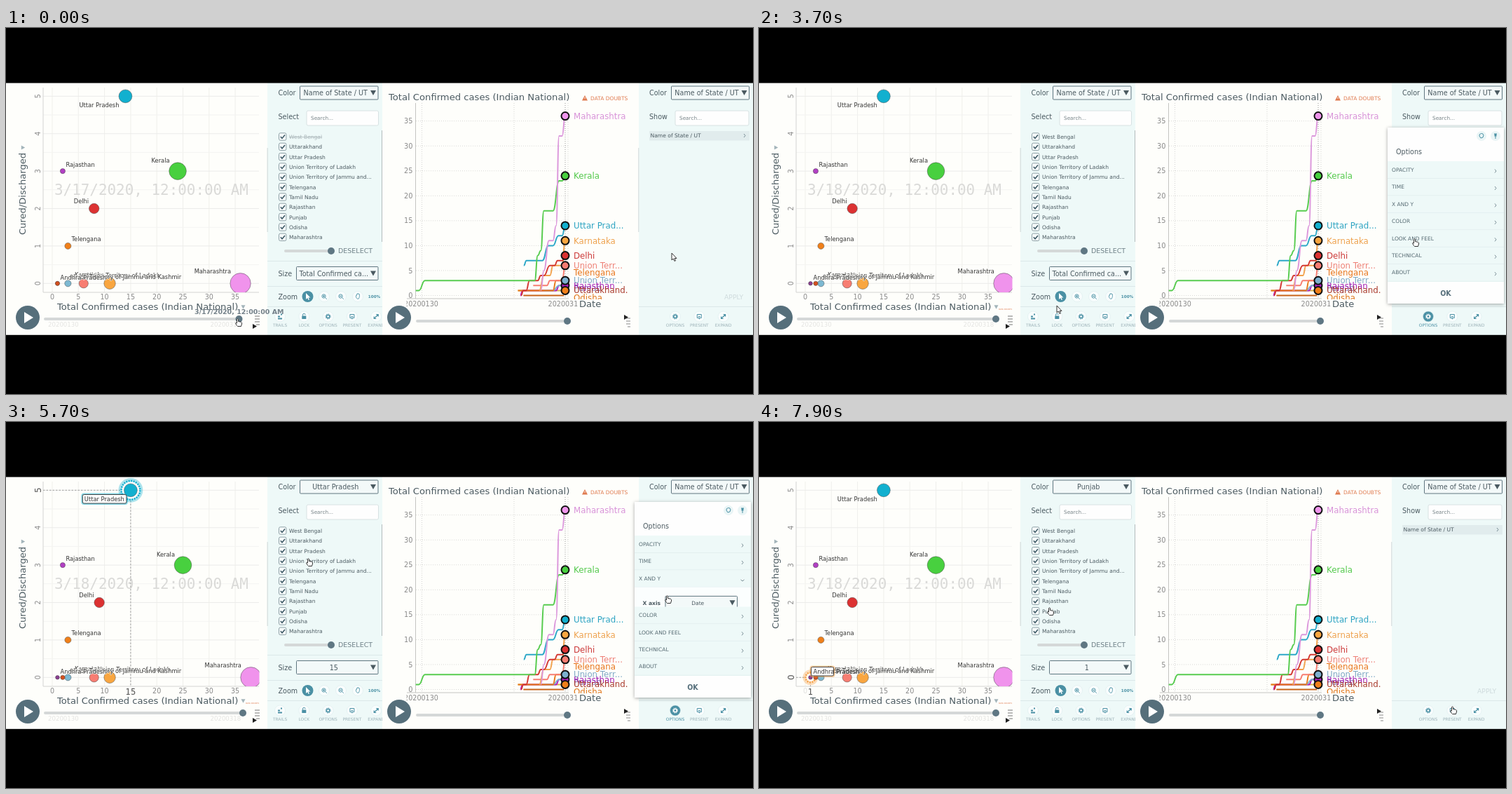
These frames come from a looping animation (1066x522 px, 8 s). An HTML page:

```html
<!DOCTYPE html>
<html lang="en">
<head>
<meta charset="utf-8">
<style>
html, body { margin: 0; width: 100%; height: 100%; overflow: hidden; background: #000; }
svg { display: block; font-family: "DejaVu Sans", sans-serif; white-space: pre; }
</style>
</head>
<body>
<svg id="stage" width="1066" height="522" viewBox="0 0 1066 522"></svg>
<script>
const stage = document.getElementById('stage');
const LOOP = 8000, STEP = 100;
const TOP = 78.5, TALL = 359.3;
const SLATE = '#566f7b', TEAL = '#4a90a4', INK = '#4b5a61', PALE = '#eef9f8', PAPER = '#fefefb';
const MID = ' text-anchor="middle" ', END = ' text-anchor="end" ', BOLD = ' font-weight="bold" ';

// Drawing helpers; text is placed by the middle of its capitals
const rect = (x, y, w, h, fill, more = '') =>
  `<rect x="${x}" y="${y}" width="${w}" height="${h}" fill="${fill}" ${more}/>`;
const dot = (x, y, r, fill, more = '') => `<circle cx="${x}" cy="${y}" r="${r}" fill="${fill}" ${more}/>`;
const path = (d, stroke, width = 1, more = '') =>
  `<path d="${d}" ${more} fill="none" stroke="${stroke}" stroke-width="${width}"/>`;
const shape = (d, fill) => `<path d="${d}" fill="${fill}"/>`;
const text = (x, y, s, size = 9.6, fill = INK, more = '') =>
  `<text x="${x}" y="${y + size * 0.365}" font-size="${size}" fill="${fill}" ${more}>${s}</text>`;
const clip = (x, y, w, h, inner) =>
  `<svg x="${x}" y="${y}" width="${w}" height="${h}" viewBox="${x} ${y} ${w} ${h}">${inner}</svg>`;
const at = (x, y, inner) => `<g transform="translate(${x} ${y})">${inner}</g>`;
const range = (n, f) => Array.from({ length: n }, (_, i) => f(i)).join('');
const short = (s, n) => s.length > n + 2 ? s.slice(0, n) + '...' : s;
const clamp = v => Math.max(0, Math.min(1, v));
const mix = (a, b, p) => a + (b - a) * p;

// Value of a track of [time, ...numbers] at time t
function along(track, t) {
  const i = track.findIndex(k => k[0] > t);
  if (i < 0) return track.at(-1).slice(1);
  if (!i) return track[0].slice(1);
  const a = track[i - 1], b = track[i], p = (t - a[0]) / (b[0] - a[0]);
  return a.slice(1).map((v, j) => mix(v, b[j + 1], p));
}

// name, cases on day 1, cases on day 2, cured, radius, colour, label side, label dx, dy
const LADAKH = 'Union Territory of Ladakh', JAMMU = 'Union Territory of Jammu and Kashmir';
const bubbles = [
  ['Maharashtra', 36, 38, 0, 14.7, '#f093ec', 'end', -13.5, -17],
  ['Kerala', 24, 25, 3, 12.3, '#48d03f', 'end', -11.5, -15.5],
  ['Uttar Pradesh', 14, 15, 5, 9.4, '#12b0cf', 'end', -9, 12.5],
  ['Karnataka', 11, 11, 0, 8.2, '#f9a640', 'end', -8, -12.5],
  ['Delhi', 8, 9, 2, 7.2, '#dc3232', 'end', -7.5, -11],
  [LADAKH, 6, 8, 0, 6.6, '#f77d72', 'start', 5, -11.5],
  [JAMMU, 3, 3, 0, 4.6, '#7db9d2', 'start', 4, -9],
  ['Telengana', 3, 3, 1, 4.5, '#f0801a', 'start', 5, -10],
  ['Rajasthan', 2, 2, 3, 3.6, '#b23fc4', 'start', 4.5, -9],
  ['Andhra Pradesh', 1, 1, 0, 2.8, '#8a3f90', 'start', 4, -8.5],
  ['', 1, 2, 0, 3.1, '#d4501e', 'start', 0, 0]
];
const single = (name, color) => [name, 1, 1, 0, 3, color, 'start', 4, -8.5];
const singles = [single('Punjab', '#f5a045'), single('Tamil Nadu', '#a8d878'), single('Odisha', '#e0702a'),
  single('Uttarakhand', '#c8501e'), single('West Bengal', '#9a6fc0')];
const rows = ['West Bengal', 'Uttarakhand', 'Uttar Pradesh', LADAKH, JAMMU, 'Telengana',
  'Tamil Nadu', 'Rajasthan', 'Punjab', 'Odisha', 'Maharashtra'];
const rowY = i => 155 + 14.33 * i;

// Line chart: colour and [day, cases] points, days counted from January 30
const lines = [
  ['#c8641a', [[33.3, 0], [46.6, 0]]],
  ['#d8b048', [[31.5, 1], [36, 1], [47, 1]]],
  ['#b01fc0', [[32.3, 0], [33, 1], [36, 1], [44, 1], [45, 2], [47, 2]]],
  ['#7db0cf', [[40, 1], [43, 1], [45, 2], [46, 2], [47, 3]]],
  ['#e87a1c', [[31.5, 1], [43, 1], [44, 3], [47, 3]]],
  ['#f77d72', [[36.5, 2], [41, 2], [42, 3], [46, 3], [47, 6]]],
  ['#f2a24c', [[38.5, 1], [40, 4], [42, 4], [43, 6], [46, 6], [47, 11]]],
  ['#d43a34', [[32.5, 0], [33.3, 1], [34.2, 1], [35.3, 3], [38, 3], [39, 4], [40, 4], [42, 6], [43.5, 6], [44.5, 7], [46, 7], [47, 8]]],
  ['#2ca8c8', [[33.4, 6], [34.3, 7], [39.5, 7], [41.5, 10], [43, 10], [44.8, 12], [46, 12], [47, 14]]],
  ['#58cc50', [[-2, 1], [-1, 1], [1, 3], [37, 3], [38, 8], [39, 9], [40, 17], [43, 17], [45, 23], [46, 23], [47, 24]]],
  ['#dc98dc', [[39, 1], [40, 5], [41.7, 11], [43, 11], [44, 14], [45, 32], [46, 32], [47, 36]]]
];
const dayX = d => 593.5 + 4.351 * d, casesY = v => 381.5 - 7.11 * v;
function curve(points) {
  let d = '', px, py;
  for (const [day, v] of points) {
    const x = dayX(day), y = casesY(v), m = (px + x) / 2;
    d += d ? `C${m} ${py} ${m} ${y} ${x} ${y}` : `M${x} ${y}`;
    [px, py] = [x, y];
  }
  return d;
}
// name, cases, label y, marker colour, label colour
const legend = [
  ['Odisha', 0, 385, '', '#e0761a'],
  ['Punjab', 1.4, 371, '', '#8a7ab8'],
  ['Rajasthan', 2, 367.5, '#b01fc0', '#a31fb4'],
  ['Uttarakhand.', 1, 374, '#f0801a', '#a8382a'],
  ['Union Territory', 3, 360, '#7db0cf', '#7fa9c6'],
  ['Telengana', 3, 349, '', '#e8741a'],
  ['Union Territory', 6, 339, '#f77d72', '#ee8076'],
  ['Delhi', 8, 325, '#dc3232', '#cc3a3a'],
  ['Karnataka', 11, 303.5, '#f9a640', '#eea24e'],
  ['Uttar Pradesh', 14, 282, '#12b0cf', '#2ba3c2'],
  ['Kerala', 24, 211, '#48d03f', '#52c94a'],
  ['Maharashtra', 36, 126, '#ef95ec', '#d892d8']
];

// Pointers: time, x, y
const leftTrack = [[1200, 332, 420], [2200, 337, 421], [2800, 340, 421], [3700, 428, 402], [4000, 429, 417],
  [4600, 434, 317], [4700, 435, 301], [5600, 433, 188], [5700, 433, 200], [6000, 442, 250], [6100, 443, 251],
  [6600, 438, 253], [7300, 420, 285], [7900, 416, 270]];
const rightTrack = [[1300, 953, 327], [2200, 958, 413], [3000, 960, 413], [3300, 976, 370], [3700, 937, 306],
  [4700, 952, 209], [5300, 943, 251], [5700, 945, 253], [6100, 944, 250], [6600, 944, 250],
  [7000, 980, 379], [7300, 980, 379], [7900, 991, 411]];
const filled = d => path(d, '#333', 1).replace('fill="none"', 'fill="#fff"');
const pointers = {
  hand: filled('M-2.5 4.5L-4.5 1Q-4 -.5 -2.5 1V-4.5Q-1.5 -6 -.5 -4.5V-1.5L3.5 -.7Q5 0 4.5 2L3.5 5.5H-1.5Z'),
  arrow: filled('M-3 -6V4L-.8 2 1 5.5 2.5 4.8 1 1.5H4Z'),
  beam: path('M-2 -5H2M0 -5V5M-2 5H2M-1.5 0H1.5', '#222')
};

// Widgets
const down = (x, y, s = 4, fill = INK) => shape(`M${x - s} ${y - s * 0.9}h${2 * s}l${-s} ${s * 1.8}z`, fill);
const chevron = (x, y) => path(`M${x - 1} ${y - 2.5}l2 2.5l-2 2.5`, '#6b8189', 0.9);
const select = (x, y, w, s, size = 9.6) => rect(x, y - 9.5, w, 19, '#f3f9f9', 'stroke="#607680" rx="1"')
  + text(x + w / 2 - 5, y, s, size, INK, MID) + down(x + w - 7, y);
const search = (x, w) => rect(x, 118, w, 21, '#fefefe', 'stroke="#d8e2e3" rx="2"') + text(x + 6, 128.5, 'Search...', 7.3, '#7a868a');
const field = (x, y, s) => rect(x, y - 8, 41, 16, '#fff', 'stroke="#dde5e6" rx="2"')
  + clip(x + 1, y - 7, 36, 14, text(x + 2, y, s, 7.6, '#222'));
const slider = (x, w, y, knob) => rect(x, y - 2, w, 4, '#d5d8d8', 'rx="2"') + dot(knob, y, 5, '#5f7783');
const play = x => dot(x, 413, 17, SLATE) + shape(`M${x - 5} 405l13 8l-13 8z`, '#fff');
const glyphs = {
  TRAILS: path('M-3 3h6M-3 0h3M1 -3h2', TEAL, 1.8),
  LOCK: rect(-3, -1, 6, 4.5, TEAL) + path('M-1.8 -1v-1.4a1.8 1.8 0 0 1 3.6 0', TEAL),
  OPTIONS: dot(0, 0, 2.2, 'none', 'stroke="currentColor" stroke-width="1.6"') + dot(0, 0, 3.6, 'none', 'stroke="currentColor" stroke-dasharray="1.4 1.4"'),
  PRESENT: path('M-3 -3h6v5h-6zM-1.5 0h3M0 2v2', TEAL),
  EXPAND: path('M-3 3L3 -3M0 -3h3v3M-3 0v3h3', TEAL, 1.2)
};
const tool = (x, name, on) => at(x, 411.5, dot(0, 0, 7.5, on ? TEAL : '#f8fdfd', 'stroke="#dcebec" stroke-width=".6"')
  + `<g color="${on ? '#fff' : TEAL}">${glyphs[name]}</g>`) + text(x, 424, name, 5.9, on ? TEAL : '#9db2b8', MID);
const lens = (x, d) => dot(x, 383, 7.5, '#f8fdfd', 'stroke="#dcebec" stroke-width=".6"')
  + dot(x - 0.5, 382.5, 2.6, 'none', `stroke="${TEAL}"`) + path(`M${x + 1.5} 384.5l2.3 2.3M${x - 2} 382.5h3${d}`, TEAL, 0.9);
const divider = (x, w, y) => rect(x, y, w, 1, '#dbe8e9');

function clock(p) {
  const s = Math.round(p * 86400), h = Math.floor(s / 3600) % 24, two = v => String(v).padStart(2, '0');
  return `3/${p < 1 ? 17 : 18}/2020, ${h % 12 || 12}:${two(Math.floor(s / 60) % 60)}:${two(s % 60)} ${h < 12 ? 'AM' : 'PM'}`;
}

const plotX = v => 66 + 7.46 * v, plotY = v => 364.3 - 53.4 * v;
const HALO = 'paint-order="stroke" stroke="#fefefb" stroke-width="1.6" stroke-opacity=".75"';

function scatter(p, hover, dragging) {
  const now = clock(p);
  let s = rect(0, TOP, 373, TALL, PAPER);
  s += range(8, i => rect(plotX(i * 5) - 0.5, 85, 1, 292, '#efefec'));
  s += range(11, i => rect(53, plotY(i / 2) - 0.5, 308, 1, i % 2 ? '#f4f4f1' : '#ececea'));
  s += path('M53 85V377H361', '#d4d4d2');
  s += text(69, 230, now, 277 / now.length / 0.602, '#dadad8', 'font-family="DejaVu Sans Mono, monospace"');

  const hx = hover && mix(hover[1], hover[2], p), hy = hover && hover[3];
  const upright = (v, size, fill) =>
    `<g transform="translate(45.5 ${plotY(v)}) rotate(-90)">${text(0, 0, v, size, fill, MID)}</g>`;
  s += range(6, i => hover && hy === i ? '' : upright(i, 9.6, '#8a8a8a'));
  s += range(8, i => text(plotX(i * 5), 383.5, i * 5, 9.6, '#8a8a8a',
    MID + (hover && Math.abs(hx - i * 5) < 1.6 ? 'opacity=".25"' : '')));

  let marks = '', tag = '';
  if (hover) {
    const x = plotX(hx), y = plotY(hy), [name, , , , r, color, side, dx, dy] = hover;
    s += upright(hy, 12, '#555') + text(x, 385, Math.round(hx), 11.5, '#555', MID);
    s += path(`M53 ${y}H${x}V377`, '#a0a0a0', 1, 'stroke-dasharray="2.5 2"');
    marks += dot(x, y, r + 5.5, '#fff', `stroke="${color}" stroke-width="5" stroke-opacity=".35"`)
      + dot(x, y, r + 4, 'none', `stroke="${color}" stroke-width="2.5" stroke-dasharray="2 1.5"`);
    const w = name.length * 4.35 + 6, left = x + dx + (side === 'end' ? 3 - w : -3);
    tag = rect(left, y + dy - 6.3, w, 12.5, '#fff', `rx="2" stroke="${color}" stroke-width="4" stroke-opacity=".5"`)
      + rect(left, y + dy - 6.3, w, 12.5, '#fff', 'rx="2" stroke="#444"')
      + text(x + dx, y + dy, singles.includes(hover) ? 'Andhra Pradesh' : name, 8.3, '#333', `text-anchor="${side}"`);
  }
  for (const [name, a, b, v, r, color] of bubbles)
    marks += dot(plotX(mix(a, b, p)), plotY(v), r, color, 'stroke="#444" stroke-opacity=".6" stroke-width=".8"');
  s += clip(53, TOP, 308.5, 298.5, marks);
  for (const [name, a, b, v, r, color, side, dx, dy] of bubbles)
    s += text(plotX(mix(a, b, p)) + dx, plotY(v) + dy, name, 8.3, '#333', `text-anchor="${side}" ${HALO}`);
  s += tag;

  s += `<g transform="translate(23.5 236.5) rotate(-90)">${text(0, 0, 'Cured/Discharged', 13.1, INK, MID)}${down(66, 1, 3, '#a3b4ba')}</g>`;
  s += text(73, 397, 'Total Confirmed cases (Indian National)', 13.15) + down(338.5, 398, 3, '#a3b4ba');
  s += text(60, 423, '20200130', 8.6, '#e4e4e2') + text(291.5, 423, '20200318', 8.6, '#e4e4e2');
  s += play(31) + slider(54, 282, 415, 332.5 + 5.5 * p);
  s += path('M355 411h7M355 415h7M355 419h7M357 423h5', '#777') + shape('M352 422l6 3.5l-6 3.5z', '#222');
  return s + (dragging ? '' : text(342, 401, 'DATA DOUBTS', 2.7, '#e07b50'));
}

function leftPanel(p, hover) {
  let s = rect(373, TOP, 164, TALL, PALE) + rect(372.5, 171, 1.5, 120, '#d9e2e2');
  s += text(388.5, 92.5, 'Color') + select(419.5, 92.5, 111.5, hover ? short(hover[0], 18) : 'Name of State / UT');
  s += text(388.5, 126, 'Select') + search(429, 102.5);
  rows.forEach((name, i) => {
    const y = rowY(i), off = !i && p < 1;
    s += rect(389.5, y - 5.2, 10.4, 10.4, '#f6fbfb', 'rx="2" stroke="#8ea0a6"') + path(`M391.8 ${y}l2.2 2.4l4 -4.8`, '#3f5a66', 1.6);
    s += text(404, y + 0.3, short(name, 28), 7.55, off ? '#a9b5b8' : INK, off ? 'text-decoration="line-through"' : '');
  });
  s += rect(536, 146, 1.2, 159, '#b4bcbe') + slider(397, 67, 318, 464) + text(474, 318, 'DESELECT', 9.5, '#6d7f86');
  s += divider(373, 164, 332) + text(388.5, 350, 'Size');
  s += select(414.5, 350, 116.5, hover ? Math.round(mix(hover[1], hover[2], p)) : 'Total Confirmed ca...');
  s += divider(373, 164, 368) + text(388.5, 383, 'Zoom');
  s += dot(430.5, 383, 8, TEAL) + shape('M428 378v9l2.2 -2l1.4 3l1.3 -.6l-1.3 -2.8h2.8z', '#fff');
  s += lens(454, 'm-1.5 -1.5v3') + lens(478, '');
  s += dot(502, 383, 7.5, '#f8fdfd', 'stroke="#dcebec" stroke-width=".6"') + path('M499.5 384v-2.5h1v-2h1.2v-.8h1.2v1h1.5v4l-1.2 2.5h-2z', TEAL, 0.8);
  s += text(525.5, 383, '100%', 5.6, TEAL, MID + BOLD) + divider(373, 164, 397);
  return s + clip(373, 398, 164, 39, ['TRAILS', 'LOCK', 'OPTIONS', 'PRESENT', 'EXPAND'].map((n, i) => tool(391 + 34.3 * i, n)).join(''));
}

function lineChart() {
  let s = rect(537, TOP, 366, TALL, PAPER);
  s += text(546, 98, 'Total Confirmed cases (Indian National)', 13.15);
  s += shape('M826 96l4 7.5h-8z', '#e07b50') + rect(825.6, 98.5, 0.9, 2.5, '#fff') + text(834, 100, 'DATA DOUBTS', 7.5, '#e07b50');
  const dots = 'stroke-dasharray="1 2"';
  s += range(8, i => path(`M585 ${casesY(i * 5)}H803`, '#d9d9d7', 1, dots) + text(580.5, casesY(i * 5), i * 5, 9.8, '#8a8a8a', END));
  s += path('M593.5 107V386M725 107V386M802 107V386', '#d4d4d2', 1, dots) + path('M798 107V386', '#999', 1, dots);
  s += path('M584.5 107V386M572 386H803', '#c4c4c2');
  s += clip(571.5, 387, 244, 14, text(592.5, 393.5, '20200130', 9.6, '#8a8a8a', MID) + text(798, 393.5, '20200317', 9.6, '#8a8a8a', MID));
  s += text(818, 393, 'Date', 13.1);
  s += lines.map(([color, points]) => path(curve(points), color, 2)).join('');
  const marks = legend.map(([, v, , fill]) => fill && dot(798, casesY(v), 5.5, fill, 'stroke="#111" stroke-width="2"')).join('');
  const names = legend.map(([n, , y, , fill]) => text(810, y, short(n, 10), 11.8, fill)).join('');
  s += marks + clip(805, 107, 82, 280, names);
  s += play(561) + slider(585, 212, 418, 801);
  return s + path('M885 414h6M885 418h6M885 422h6M887 426h4', '#888') + shape('M882 409l6 3.5l-6 3.5z', '#222');
}

function rightPanel(open) {
  let s = rect(903, TOP, 163, TALL, PALE) + rect(902, 171, 1.5, 120, '#dde4e4');
  s += text(918, 92.5, 'Color') + select(949.5, 92.5, 111, 'Name of State / UT') + text(918, 126, 'Show') + search(955, 105);
  s += rect(918, 147, 143, 13.5, '#e1eced') + text(919.5, 153.5, 'Name of State / UT', 7.6) + chevron(1054, 153.5);
  s += text(1025, 384, 'APPLY', 9.3, '#cfdbdd') + divider(903, 163, 397);
  return s + ['OPTIONS', 'PRESENT', 'EXPAND'].map((n, i) => tool(955 + 34.3 * i, n, open && !i)).join('');
}

// Options pop-up; grow is the height of the unfolded section
function popup(alpha, grow) {
  const up = Math.min(grow, 65), top = 142 - up, scrolled = grow > 65, edge = scrolled ? 7 : 0;
  let s = rect(897, top, 166, 251 + up, '#fefefe', 'filter="url(#shadow)"');
  const y0 = 154 - up;
  s += dot(1031, y0, 7, '#eaf5f6') + path(`M1028 ${y0}a3 3 0 0 1 6 -1l-1 3l-3 1z`, TEAL);
  s += dot(1051, y0, 7, '#eaf5f6') + path(`M1049 ${y0 - 3}h4M1051 ${y0}v4`, TEAL) + rect(1049.5, y0 - 3, 3, 3.5, TEAL);
  s += text(909, 176.5 - up, 'Options');
  let list = rect(897, 190 - up, 166, 172 + up, PALE);
  ['OPACITY', 'TIME', 'X AND Y', 'COLOR', 'LOOK AND FEEL', 'TECHNICAL', 'ABOUT'].forEach((name, i) => {
    const y = 202 + 24.45 * i - up + (i > 2 ? grow : 0), unfolded = i === 2 && grow;
    list += rect(897, y + 12, 166, 0.8, '#e0edee') + text(903, y, name, 7.5, '#566a72');
    list += unfolded ? path(`M${1048.5 - edge} ${y + 2}l2.5 2l2.5 -2`, '#6b8189', 0.9) : chevron(1051 - edge, y + 2);
    if (!unfolded) return;
    const w = 102.5 - edge, body = (label, value, lo, hi, dy) =>
      text(908.5, y + dy, label, 7.6, INK, BOLD) + select(941, y + dy, w, value, 7.5)
      + text(908.5, y + dy + 27.5, 'min:', 7.5) + field(929.5, y + dy + 27.5, lo)
      + text(977, y + dy + 27.5, 'max:', 7.5) + field(1000.5, y + dy + 27.5, hi);
    list += clip(897, y + 12.5, 166, grow, rect(897, y + 12, 166, grow + 1, '#fbfefe')
      + body('X axis', 'Date', '20200130', '20200318', 35) + body('Y axis', 'Total Confirmed ca...', '0.0', '38', 92.5));
  });
  s += clip(897, 190 - up, 166, 172 + up, list);
  if (scrolled) s += rect(1057.5, 125, 5.5, 237, '#d0d4d4') + rect(1058, 127, 4.5, 174, '#8f9596');
  s += text(980, 378, 'OK', 9.6, SLATE, MID + BOLD);
  return `<g opacity="${alpha}">${s}</g>`;
}

const SHADOW = '<defs><filter id="shadow" x="-10%" y="-10%" width="120%" height="120%"><feDropShadow dx="0" dy="1" stdDeviation="2.5" flood-opacity=".35"/></filter></defs>';
const still = lineChart();

function hovered(t) {
  const [x, y] = along(leftTrack, t - STEP), i = Math.round((y - 160) / 14.33);
  return t > 4000 && x > 385 && rows[i] && [...bubbles, ...singles].find(b => b[0] === rows[i]);
}

function draw(t) {
  const p = clamp((t / STEP - 12) * 0.062206), hover = hovered(t), dragging = t < 2900;
  const alpha = clamp((t - 2300) / 300) * clamp((7400 - t) / 200);
  const [grow] = along([[5500, 0], [5700, 28], [6000, 137.5]], t);
  const rightKind = t < 1900 ? 'arrow' : t >= 6000 && t < 6700 ? 'beam' : 'hand';
  stage.innerHTML = SHADOW + scatter(p, hover, dragging) + leftPanel(p, hover) + still + rightPanel(alpha > 0)
    + (dragging ? text(396.5, 405, clock(p), 9.5, '#74818a', END + BOLD) : '')
    + (alpha ? clip(890, TOP, 176, TALL, popup(alpha, grow)) : '')
    + at(...along(leftTrack, t), pointers[dragging || hover ? 'hand' : 'arrow'])
    + at(...along(rightTrack, t), pointers[rightKind]);
}

const start = performance.now();
let last = -1;
function tick() {
  const t = Math.floor((performance.now() - start) % LOOP / STEP) * STEP;
  if (t !== last) draw(last = t);
  requestAnimationFrame(tick);
}
tick();
</script>
</body>
</html>
```
